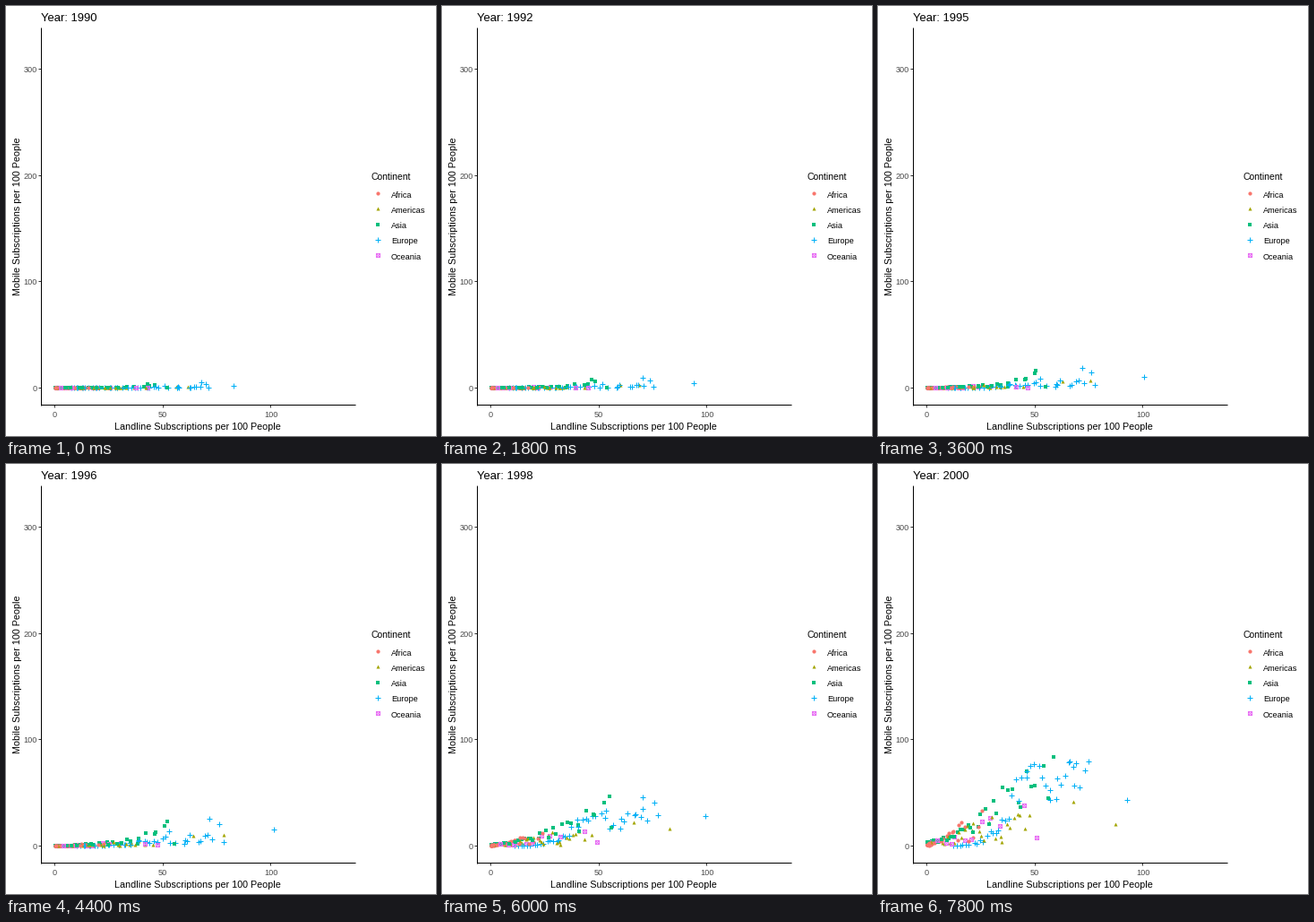
Recreate the animation shown at these times as a matplotlib script. Size 480 by 480 pixels, loop 8000 ms.

```python
import matplotlib.pyplot as plt
import numpy as np
from matplotlib.animation import FuncAnimation
from matplotlib.path import Path

SIZE, FRAMES, INTERVAL = 480, 40, 200
PX = 0.72  # points per pixel at 100 dpi
FRAMES_PER_YEAR = 99 / 26
TAKEOFF = 6.57  # years after 1990 when mobile growth turns steep
END = (FRAMES - 1) / FRAMES_PER_YEAR

plt.rcParams["font.family"] = "Liberation Sans"

BOX_CROSS = Path(
    [(-1, -1), (1, -1), (1, 1), (-1, 1), (-1, -1), (1, 1), (-1, 1), (1, -1)],
    [1, 2, 2, 2, 2, 2, 1, 2])

# marker, size in px, colour, edge width in px
STYLES = {
    "Africa": ("o", 4.2, "#F8766D", 0),
    "Americas": ("^", 4.0, "#A3A500", 0),
    "Asia": ("s", 4.2, "#00BF7D", 0),
    "Europe": ("+", 6.2, "#00B0F6", 1),
    "Oceania": (BOX_CROSS, 4.2, "#E76BF3", 0.9),
}

# count, landline range, skew; mobile ceiling, midpoint, width, scatter
GROUPS = {
    "Africa": (46, 0.2, 26, 3.5, 36, 14, 5, 0.9),
    "Americas": (30, 1, 48, 1.1, 32, 16, 8, 0.95),
    "Asia": (40, 0.3, 57, 1.8, 80, 28, 9, 0.6),
    "Europe": (42, 12, 75, 1, 79, 36, 4, 0.5),
    "Oceania": (16, 1, 53, 2.2, 48, 26, 10, 0.9),
}

# outliers: landline at start and end, mobile at take-off and end
OUTLIERS = [
    ("Europe", 83, 93, 20, 43),
    ("Europe", 68, 68, 32, 74),
    ("Americas", 61.5, 87.5, 14, 20),
    ("Americas", 56.5, 68, 13, 41),
    ("Asia", 43, 58.7, 29, 83),
]


def group_rows(rng, n, low, high, skew, top, mid, width, scatter):
    u = (np.arange(n) + rng.random(n)) / n
    a, b, c = rng.random((3, n))
    x1 = low + (high - low) * u ** skew
    x0 = x1 * np.minimum(0.95, 0.45 + 0.4 * x1 / 60 + 0.15 * a)
    y1 = top / (1 + np.exp((mid - x1) / width)) * (1 - scatter * b ** 2)
    early = y1 * (0.06 + 0.4 * c ** 2 * x1 / 75)
    return np.column_stack([x0, x1, early, y1])


def build_points():
    rng = np.random.default_rng(11)
    names = [o[0] for o in OUTLIERS]
    rows = [[o[1:] for o in OUTLIERS]]
    for name, spec in GROUPS.items():
        rows.append(group_rows(rng, *spec))
        names += [name] * spec[0]
    order = rng.permutation(len(names))
    return [names[i] for i in order], np.vstack(rows)[order].T


NAMES, (X0, X1, EARLY, LATE) = build_points()


def to_px(x, y):
    return 54.3 + 2.41 * x, 426 - 1.187 * y


def positions(year):
    s = year / END
    # the highest landline rates peak midway and fall back
    x = X0 + (X1 - X0) * s + 13 * (X0 / 83) ** 6 * np.sin(np.pi * s)
    if year < TAKEOFF:
        y = EARLY * np.exp((0.5 - 0.0065 * EARLY) * (year - TAKEOFF))
    else:
        p = (year - TAKEOFF) / (END - TAKEOFF)
        y = EARLY + (LATE - EARLY) * p ** 1.1
    return to_px(x, y)


fig = plt.figure(figsize=(SIZE / 100, SIZE / 100), dpi=100, facecolor="white")
ax = fig.add_axes([0, 0, 1, 1])
ax.set(xlim=(0, SIZE), ylim=(SIZE, 0))
ax.axis("off")


def text(x, y, s, size, color="black", **kw):
    kw = {"va": "baseline", **kw}
    return ax.text(x, y, s, fontsize=size * PX, color=color, **kw)


def line(xs, ys, color="black"):
    ax.plot(xs, ys, color=color, lw=PX, solid_capstyle="butt")


def dot(name, x, y, z=3):
    marker, size, color, edge = STYLES[name]
    return ax.plot([x], [y], ls="none", marker=marker, ms=size * PX,
                   mfc="none" if edge else color, mec=color,
                   mew=edge * PX, zorder=z)[0]


def draw_axes():
    for v in range(0, 101, 50):
        x = to_px(v, 0)[0]
        line([x, x], [445, 448], "#333333")
        text(x + 0.3, 459, str(v), 9.1, "#4D4D4D", ha="center")
    for v in range(0, 301, 100):
        y = to_px(0, v)[1]
        line([36, 39], [y, y], "#333333")
        text(34.5, y + 4, str(v), 9.1, "#4D4D4D", ha="right")
    line([39, 39], [24, 446])
    line([39, 390], [445, 445])
    text(214, 473, "Landline Subscriptions per 100 People", 10.8, ha="center")
    text(12.6, 235, "Mobile Subscriptions per 100 People", 10.8,
         ha="center", va="center", rotation=90)


def draw_legend():
    text(407, 194, "Continent", 10.4)
    for i, name in enumerate(STYLES):
        y = 209 + 17.3 * i
        dot(name, 415, y)
        text(430, y + 4.5, name, 9.2)


draw_axes()
draw_legend()
title = text(39, 17, "", 13)
dots = [dot(name, 0, 0, 3 + i / 1000) for i, name in enumerate(NAMES)]


def update(frame):
    year = frame / FRAMES_PER_YEAR
    title.set_text(f"Year: {1990 + round(year)}")
    for d, x, y in zip(dots, *positions(year)):
        d.set_data([x], [y])
    return [title, *dots]


anim = FuncAnimation(fig, update, frames=FRAMES, interval=INTERVAL,
                     init_func=lambda: update(0), repeat=True, repeat_delay=0)
plt.show()
```
